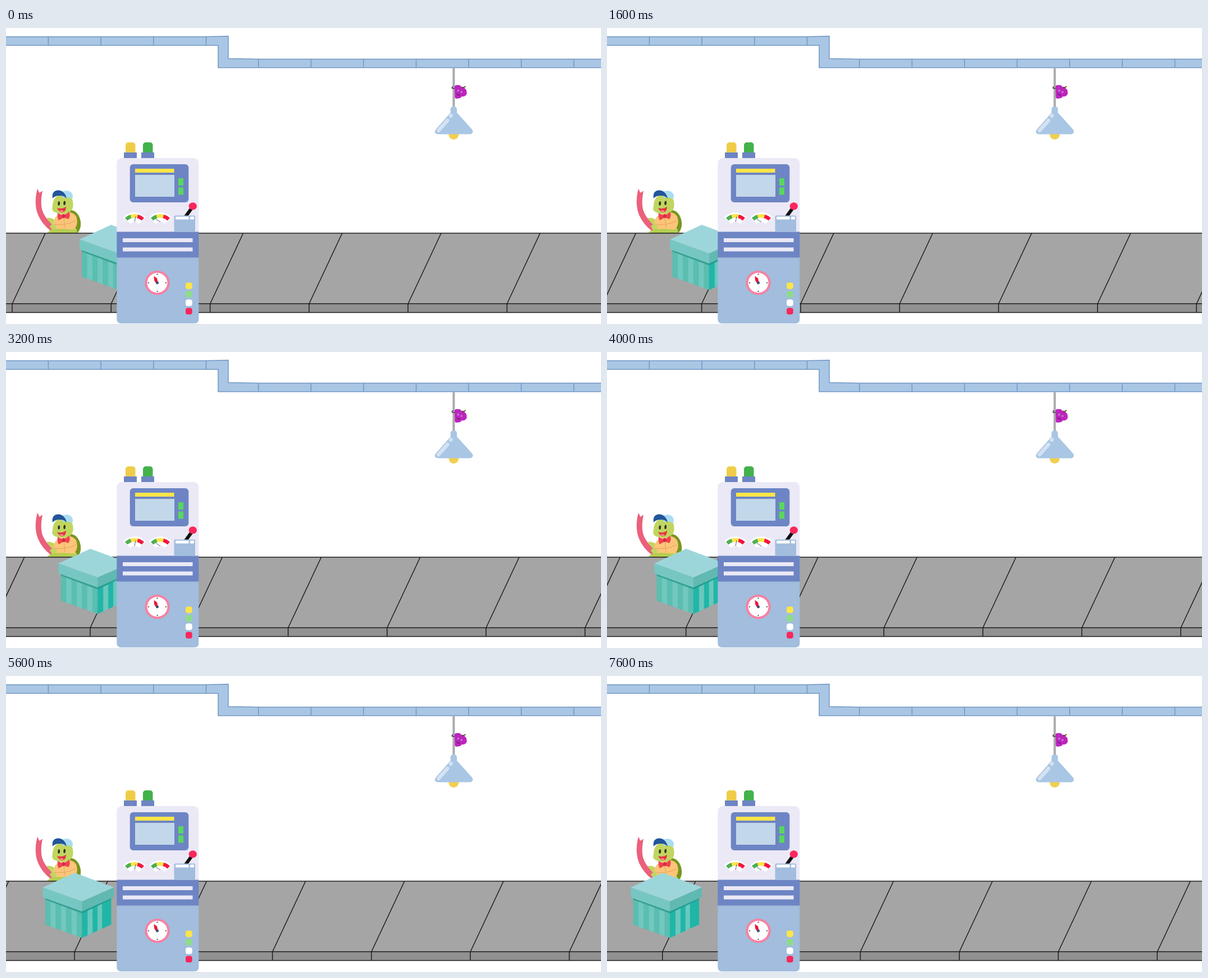
An HTML page with a canvas that plays this animation: 1060x528 px, repeating every 8 s.

```html
<!DOCTYPE html>
<html lang="en">
<head>
<meta charset="utf-8">
<title>Conveyor</title>
<style>
html, body { margin: 0; width: 100%; height: 100%; overflow: hidden; background: #fff; }
canvas { display: block; }
</style>
</head>
<body>
<canvas id="stage" width="1060" height="528"></canvas>
<script>
const ctx = document.getElementById('stage').getContext('2d');
const LOOP = 8000, STEP = 400, STEP_PX = 4.66, SLAB = 176.3;
const BLUE = '#6d85c4', PALE = '#a2bddd', LILAC = '#ebe9f6', PIPE = '#a9c6e4', INK = '#1c1c1c';
const YELLOW = '#fce54a', RED = '#fa265c', SKIN = '#c0d660';

function shape(d, fill, stroke, width = 1) {
  const path = new Path2D(d);
  if (fill) { ctx.fillStyle = fill; ctx.fill(path); }
  if (stroke) { ctx.strokeStyle = stroke; ctx.lineWidth = width; ctx.stroke(path); }
}
function box(x, y, w, h, fill, r = 0) {
  ctx.fillStyle = fill;
  ctx.beginPath();
  ctx.roundRect(x, y, w, h, r);
  ctx.fill();
}
function oval(x, y, rx, ry, fill, turn = 0) {
  ctx.fillStyle = fill;
  ctx.beginPath();
  ctx.ellipse(x, y, rx, ry, turn, 0, 2 * Math.PI);
  ctx.fill();
}
function line(x1, y1, x2, y2, color, width) {
  ctx.strokeStyle = color;
  ctx.lineWidth = width;
  ctx.beginPath();
  ctx.moveTo(x1, y1);
  ctx.lineTo(x2, y2);
  ctx.stroke();
}
// Ring sector, angles in degrees clockwise from straight up.
function sector(x, y, inner, outer, from, to, fill) {
  const a = (from - 90) * Math.PI / 180, b = (to - 90) * Math.PI / 180;
  ctx.fillStyle = fill;
  ctx.beginPath();
  ctx.arc(x, y, outer, a, b);
  ctx.arc(x, y, inner, b, a, true);
  ctx.fill();
}

function drawPipe() {
  const edge = '#7197c6';
  shape('M-3 15.5H356L396 14.5V54.5L450 55.5H1063V70.7H378V31H-3Z', PIPE, edge, 1.5);
  for (let i = 0; i < 4; i++) line(75.4 + i * 93.7, 15.5, 75.4 + i * 93.7, 31, edge, 1.5);
  for (let i = 0; i < 7; i++) line(449.7 + i * 93.65, 55.5, 449.7 + i * 93.65, 70.7, edge, 1.5);
}

function drawLamp() {
  line(797.6, 71.5, 797.6, 143, '#aaa', 4);
  oval(797.6, 190, 9, 9, '#f1cf50');
  shape('M792 145Q792 140 797.6 140T803.3 145V151L829.5 180Q833 184 831 187Q829.500 189.500 826 189.500H770Q766 189.500 764.500 187Q763 184 766.500 180L792 151Z', PIPE);
  ctx.lineCap = 'round';
  line(786.5, 165, 770.5, 183, '#d3e2f2', 6.5);
  ctx.lineCap = 'butt';
  oval(792.5, 156.5, 3.4, 3.8, '#d3e2f2', 0.6);
}

function drawGrape() {
  const skin = '#bc25bf';
  shape('M799 104Q801 101 805 102Q809 101 811 105Q816 104 817.500 108Q821 110 820.500 114Q822 118 818 121Q815 123 812 122Q810 126 805 125.500Q801 127 799.500 124Z', skin);
  shape('M812 107Q815 107 819 104', null, '#5b5a22', 1.6);
  shape('M799 107.500Q794 109 794.500 106Q795 104.500 797 105', null, '#222', 1.2);
  oval(805.5, 111.5, 1.5, 1.5, '#f4cdf3');
  oval(811.5, 114, 1.5, 1.5, '#f4cdf3');
  oval(805.5, 111.5, 0.7, 0.7, '#222');
  oval(811.5, 114, 0.7, 0.7, '#222');
  shape('M803 117Q805 121 809 119', null, '#541058', 1.1);
}

function drawTurtle() {
  oval(117.5, 347, 15.5, 22, '#78951f', -0.15);
  shape('M89 344Q80 337 72 339Q76 342 73 345Q78 350 89 354Z', SKIN);
  shape('M74 365Q77 359 91 357L123 356Q128 361 126 367H75Z', SKIN);
  shape('M84 349Q86 334 99 331Q117 324 125 336Q130 351 121 359Q102 362 88 358Z', '#fcc579');
  shape('M103 336L105 357M86 350Q106 353 124 344', null, '#dca258', 0.9);
  shape('M56 286.500L59.500 294L65 290.500Q60 315 66 329Q73 344 88 356L81 363Q64 350 57 333Q49 313 56 286.500Z', '#eb607a');
  shape('M78 354Q84 346 91 355Q88 361 82 360Z', SKIN);
  shape('M80 360Q101 356 126 361V367H80Z', '#b5cd50');
  shape('M85 307Q83 312 83 317Q80 326 88 329Q99 334 112 329Q121 324 119.500 313Q119 301 108 298Q92 294 85 307Z', SKIN);
  shape('M99 292Q113 287 118 296Q120 302 118 305Q110 301 101 303Z', '#aadcf2');
  shape('M83 304Q81 293 89 290Q98 288 104 295Q108 300 107.500 304Q104 299 96 299Q87 299 83 304Z', '#22559c');
  oval(94.2, 313, 1.9, 3.7, '#34351f', 0.1);
  oval(104.2, 312.2, 1.9, 3.7, '#34351f', 0.1);
  shape('M91 321Q100 324 107 318.500Q107 328 100 329Q94 328 91 321Z', '#e7343f');
  shape('M95 326Q99 323 103 327L100 329Z', '#f58c91');
  shape('M102.500 335L92 330Q90.500 337 94 343L103 338L111 341Q116 334 112 328Z', '#ef4352');
  oval(102.7, 335.5, 3, 3.4, '#d92b42');
}

function drawBelt(shift) {
  box(0, 366, 1060, 126, '#a5a5a5');
  box(0, 492, 1060, 16, '#919191');
  for (const y of [366, 491.8, 507.5]) line(0, y, 1060, y, INK, 1.5);
  for (let x = 11 - shift; x < 1240; x += SLAB) {
    line(x + 59, 366, x, 492, INK, 1.5);
    line(x, 491.5, x, 507.5, INK, 1.5);
  }
}

// Stripes of one side wall: follows a slanted top and bottom edge.
function wall(edges, topY, bottomY, rise, colors) {
  const x0 = edges[0];
  for (let i = 0; i + 1 < edges.length; i++) {
    const a = edges[i], b = edges[i + 1];
    const y = (base, x) => base + (x - x0) * rise;
    shape(`M${a} ${y(topY, a)}L${b} ${y(topY, b)}V${y(bottomY, b)}L${a} ${y(bottomY, a)}Z`, colors[i % 2], colors[i % 2], 0.3);
  }
}

function drawCrate(shift) {
  ctx.save();
  ctx.translate(131 - shift, 0);
  const left = Array.from({ length: 8 }, (_, i) => 4.3 + i * 9.35);
  wall(left, 394, 443.5, 0.36, ['#5abeb0', '#70c8bf']);
  wall([69.7, 79.7, 88.7, 97.5, 105.5, 121.5], 417, 467, -0.46, ['#20b6a7', '#69c8be']);
  shape('M4.300 394L69.700 418V423.500L4.300 399Z', '#37a092');
  shape('M69.700 418L121.500 394V398.500L69.700 423.500Z', '#229d90');
  shape('M0 377L69.700 402V420L1.500 395.500Q0 395 0 393Z', '#76c7c3');
  shape('M69.700 402L126.500 377V392.500Q126.500 394 125 395L69.700 420Z', '#60b9b2');
  shape('M0 377L56.500 351L126.500 377L69.700 402Z', '#9dd6da');
  ctx.restore();
}

function drawGauge(x, needleX, needleY) {
  const y = 357;
  sector(x, y, 11, 28, -46, 46, '#fff');
  sector(x, y, 18.5, 25, -43, -17, '#4caf4e');
  sector(x, y, 18.5, 25, -17, 14, YELLOW);
  sector(x, y, 18.5, 25, 14, 43, '#f3173f');
  line(x, 346, needleX, needleY, '#3e5378', 0.9);
}

function drawMachine() {
  box(213, 204, 17.5, 20, '#f0ce49', [5, 5, 0, 0]);
  box(244, 204, 17.5, 20, '#43b24a', [5, 5, 0, 0]);
  for (let y = 207; y < 222; y += 3)
    for (let x = 215; x < 230; x += 3) box(x, y, 1, 1, '#e4bf45');
  box(210, 222, 23, 11, BLUE);
  box(241, 222, 23, 11, BLUE);

  box(197.3, 232, 146, 134, LILAC, [9, 9, 0, 0]);
  box(197.3, 409, 146, 118, PALE, [0, 0, 7, 7]);
  box(197.3, 363.5, 146, 46, BLUE);
  box(208, 375, 124.5, 7, LILAC);
  box(208, 391.5, 124.5, 7, LILAC);

  box(220.7, 243, 104.6, 68, BLUE, 6);
  box(230, 251, 69.5, 7, YELLOW);
  box(230, 262, 70, 39, '#c3d7ea');
  box(307, 268, 9, 13, '#58d75c');
  box(307, 284.5, 9, 13, '#58d75c');

  drawGauge(229, 231, 336);
  drawGauge(275, 267, 341);

  line(319.5, 337, 331, 321, '#111', 6);
  oval(332.8, 317.8, 7.2, 6.5, RED);
  box(299.5, 334.5, 37.5, 29.2, PALE, [2, 2, 0, 0]);
  box(302, 336.5, 23.5, 5, '#fff', 1);
  box(328, 336.5, 7, 5, '#fff', 1);

  oval(269.5, 454.5, 22.2, 21.7, '#f781a3');
  oval(269.5, 454.5, 18, 17.7, '#fff');
  for (let i = 0; i < 4; i++) {
    const a = i * Math.PI / 2;
    oval(269.5 + 15.5 * Math.cos(a), 454.5 + 15.2 * Math.sin(a), 1, 1, '#222');
  }
  shape('M263.500 442.500L269 446.500L270.500 453L267 455L264 450Z', '#ee1738');
  oval(269.5, 454.5, 2.5, 2.5, '#3c507b');

  [YELLOW, '#8ddc8a', '#fff', RED].forEach((color, i) => box(320, 454 + i * 15.1, 11.7, 11.7, color, 4));
}

function draw(time) {
  const shift = Math.floor(time % LOOP / STEP) * STEP_PX;
  box(0, 0, 1060, 528, '#fff');
  drawPipe();
  drawLamp();
  drawGrape();
  drawTurtle();
  drawBelt(shift);
  drawCrate(shift);
  drawMachine();
}

const start = performance.now();
function tick() {
  draw(performance.now() - start);
  requestAnimationFrame(tick);
}
tick();
</script>
</body>
</html>
```
